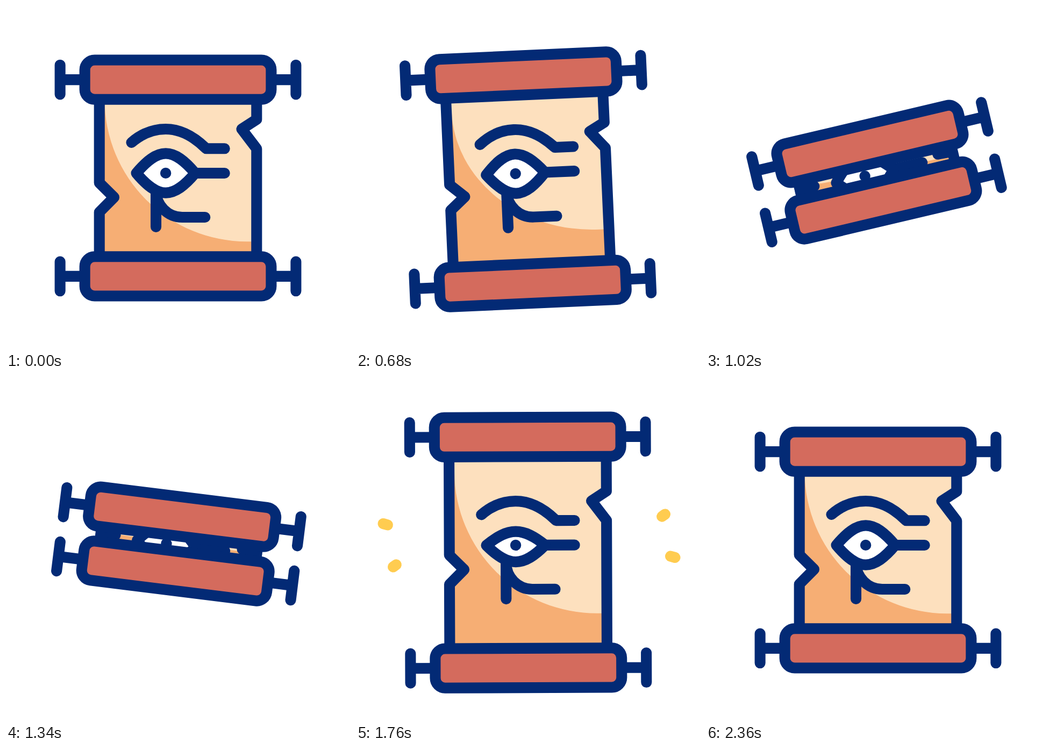
Write an HTML page that moves like this. It is 640 by 640 pixels and loops after 2.4 s.

```html
<!DOCTYPE html>
<html lang="en">
<head>
<meta charset="utf-8">
<title>Papyrus scroll</title>
<style>
  html, body { margin: 0; width: 100%; height: 100%; overflow: hidden; background: #fff; }
  svg { display: block; width: 100vw; height: 100vh; }
  .ink { fill: none; stroke: #032a75; stroke-width: 20.1; stroke-linecap: round; stroke-linejoin: round; }
  .spark { fill: none; stroke: #ffcc50; stroke-width: 20.1; stroke-linecap: round; }
</style>
</head>
<body>
<svg viewBox="0 0 640 640">
  <defs>
    <clipPath id="sheet"><path id="clip"/></clipPath>
    <g id="roller">
      <path class="ink" d="M100.6 0H539.4M100.6 -27.4V27.4M539.4 -27.4V27.4"/>
      <rect class="ink" x="146.6" y="-36.6" width="346.8" height="73.2" rx="18.3" style="fill:#d46b5d"/>
    </g>
  </defs>
  <g id="scroll">
    <path id="paper" fill="#fde0be"/>
    <g clip-path="url(#sheet)">
      <path id="shade" fill="#f6ae74"/>
      <path class="ink" d="M233.5 254C252 238 274 229 297 229C326 229 351 244 372.5 265.3H406.7"/>
      <path class="ink" d="M352 311H406.7M279 343V411M279 343C279 371 301 393 328 393H370.3"/>
      <path id="eye" class="ink" style="fill:#fff"/>
      <circle cx="297.1" cy="310.9" r="10.2" fill="#032a75"/>
    </g>
    <path id="edges" class="ink"/>
    <use id="top" href="#roller"/>
    <use id="bottom" href="#roller"/>
  </g>
  <path id="sparkL" class="spark"/>
  <path id="sparkR" class="spark" transform="rotate(180 322 302.5)"/>
</svg>
<script>
const LOOP = 2400;
const $ = id => document.getElementById(id);
const set = (id, name, value) => $(id).setAttribute(name, value);
const mix = (a, b, p) => a + (b - a) * p;

// Tracks of [time, value], eased in and out between steps
const tracks = {
  stretch: [[0, 0], [571, 1], [1757, 1], [2345, 0]],
  fold: [[571, 0], [1062, 1], [1434, 1], [1757, 0]],
  tilt: [[533, 0], [1067, -13.6], [1333, 7.1], [1600, -4], [1867, 1.8], [2133, 0]],
  squint: [[1533, 0], [1700, 0.5], [1867, 0]],
  head: [[1480, 0], [1740, 1]],
  tail: [[1560, 0], [1815, 1]]
};

function at(name, t) {
  const steps = tracks[name];
  if (t <= steps[0][0]) return steps[0][1];
  for (let i = 1; i < steps.length; i++) {
    const [t0, a] = steps[i - 1], [t1, b] = steps[i];
    if (t < t1) {
      const s = (t - t0) / (t1 - t0);
      return mix(a, b, s * s * (3 - 2 * s));
    }
  }
  return steps[steps.length - 1][1];
}

function drawPaper(top, bottom, fold) {
  const q = 1 - 0.98 * fold;
  const y = v => 305.5 + (v - 305.5) * q;
  const left = `173.7 ${bottom}L173.7 ${y(383.5)}L201 ${y(356)}L173.7 ${y(329)}L173.7 ${top}`;
  const right = `466.3 ${top}L466.3 ${y(211)}L438.5 ${y(229)}L466.3 ${y(265.5)}L466.3 ${bottom}`;
  set("edges", "d", `M${left}M${right}`);
  for (const id of ["paper", "clip"]) set(id, "d", `M${left}L${right}Z`);
  set("shade", "d", `M173.7 ${y(173.7)}H183.5A264.5 ${264.5 * q} 0 0 0 448 ${y(438.2)}H466.3V${bottom}H173.7Z`);
}

function drawEye(squint) {
  const up = 36.6 - 32 * squint, down = 36.6 - 16 * squint;
  const lid = h => [311 + h * 0.63, 311 + h];
  const [u1, u2] = lid(-up), [d1, d2] = lid(down);
  set("eye", "d", `M242.5 311C262 ${u1} 279 ${u2} 297.2 ${u2}S332.4 ${u1} 352 311` +
    `C332.4 ${d1} 315.4 ${d2} 297.2 ${d2}S262 ${d1} 242.5 311Z`);
}

function drawSparks(head, tail) {
  const ray = (x0, y0, x1, y1) =>
    `M${mix(x0, x1, tail)} ${mix(y0, y1, tail)}L${mix(x0, x1, head)} ${mix(y0, y1, head)}`;
  const d = head - tail > 0.005 ? ray(123, 292, 50.5, 271) + ray(119, 315.5, 69, 351.5) : "";
  set("sparkL", "d", d);
  set("sparkR", "d", d);
}

function draw(t) {
  const stretch = at("stretch", t), fold = at("fold", t);
  const top = 137.1 - 27.4 * stretch + 148 * fold;
  const bottom = 502.9 + 36.6 * stretch - 180.2 * fold;
  set("scroll", "transform", `rotate(${at("tilt", t)} 320 320)`);
  set("top", "transform", `translate(0 ${top})`);
  set("bottom", "transform", `translate(0 ${bottom})`);
  drawPaper(top, bottom, fold);
  drawEye(at("squint", t));
  drawSparks(at("head", t), at("tail", t));
}

function tick() {
  draw(performance.now() % LOOP);
  requestAnimationFrame(tick);
}
tick();
</script>
</body>
</html>
```
